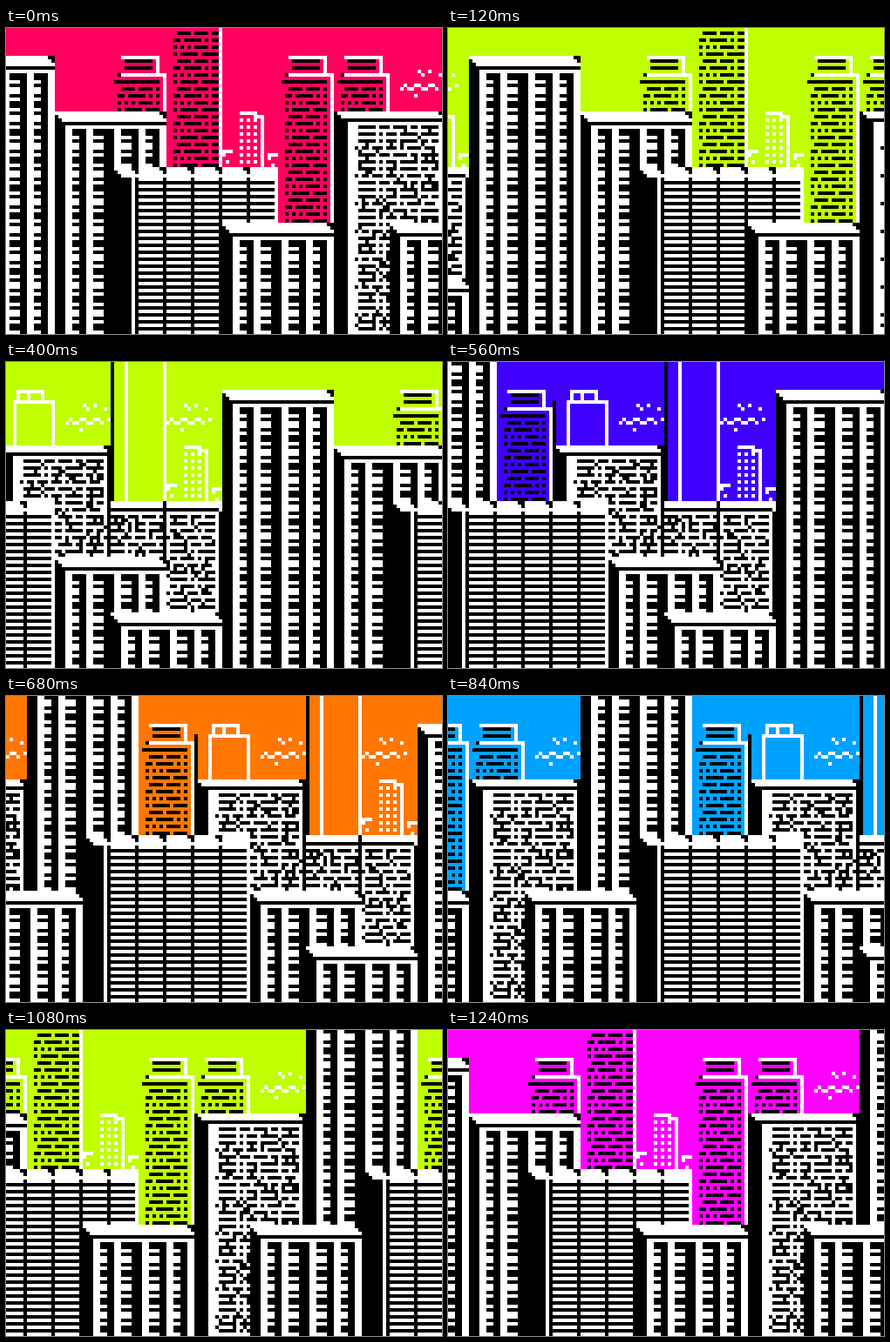
Animation of 500x352 px, one loop 1280 ms. Source, as an HTML page with a canvas:

```html
<!DOCTYPE html>
<html lang="en">
<head>
<meta charset="utf-8">
<title>Pixel city</title>
<style>
  html, body { margin: 0; width: 100%; height: 100%; overflow: hidden; background: #000; }
  canvas { display: block; width: 500px; height: 352px; image-rendering: pixelated; }
</style>
</head>
<body>
<canvas id="view" width="125" height="88"></canvas>
<script>
const WORLD = 256, HEIGHT = 88, STEP_MS = 40, STEPS = 32, STEP_CELLS = 8;
const BLACK = '#000', WHITE = '#fff';
const SKIES = ['#ff005f', '#ff7700', '#bfff00', '#bfff00', '#00ff7f', '#00a2ff', '#3f00ff', '#ff00ff'];

// The skyline is drawn once, one canvas pixel per cell, with a transparent sky.
const city = document.createElement('canvas');
city.width = WORLD;
city.height = HEIGHT;
const pen = city.getContext('2d');

function rect(x, y, w, h, color) {
  pen.fillStyle = color || BLACK;
  for (const wrap of [0, -WORLD]) {
    if (color) pen.fillRect(x + wrap, y, w, h);
    else pen.clearRect(x + wrap, y, w, h);
  }
}

function noise(x, y) {
  const n = Math.sin(x * 12.9898 + y * 78.233) * 43758.5453;
  return n - Math.floor(n);
}

// Two broken, scalloped outlines, the upper one shorter.
function cloud(x) {
  for (const [y, start, end] of [[12, 5, 13], [16, 0, 13]]) {
    for (let dx = start; dx < end; dx++) {
      const dip = Math.sin(dx * 1.6) > 0 ? 0 : 1;
      if (noise(dx, y) > 0.25) rect(x + dx, y + dip, 1, 1, WHITE);
    }
  }
  rect(x + 4, 19, 1, 1, WHITE);
}

// Rows of black dashes; the pattern repeats with the 8-cell tile.
function bricks(x, top, width, bottom) {
  for (let y = top; y < bottom; y += 2) {
    let dx = Math.floor(noise(1, y % 8) * 2);
    while (dx < width) {
      const len = 1 + Math.floor(noise(dx, y % 8) * 5);
      rect(x + dx, y, Math.min(len, width - dx), 1, BLACK);
      dx += len + 1;
    }
  }
}

function steppedTower(x, bottom) {
  rect(x, 8, 16, bottom - 8, null);
  rect(x + 3, 8, 11, 1, WHITE);
  rect(x + 13, 8, 1, 5, WHITE);
  rect(x + 4, 9, 8, 1, BLACK);
  rect(x + 4, 11, 8, 1, BLACK);
  rect(x + 2, 13, 1, 1, BLACK);
  rect(x + 3, 13, 13, 1, WHITE);
  rect(x + 15, 13, 1, bottom - 13, WHITE);
  rect(x + 1, 15, 13, 1, BLACK);
  bricks(x + 2, 17, 12, bottom);
}

function farBlock(x) {
  rect(x + 5, 24, 5, 1, WHITE);
  rect(x + 9, 25, 3, 1, WHITE);
  rect(x + 11, 25, 1, 15, WHITE);
  for (let y = 26; y < 40; y += 2) {
    for (let dx = 5; dx < 11; dx += 2) rect(x + dx, y, 1, 1, WHITE);
  }
  for (const [dx, y] of [[0, 35], [13, 36]]) {
    rect(x + dx, y, 3, 1, WHITE);
    rect(x + dx, y + 1, 1, 1, WHITE);
    rect(x + dx + 1, y + 3, 1, 1, WHITE);
  }
}

// White slab with a stepped left corner and a black line under it.
function roof(x, y, line) {
  rect(x, y, 32, HEIGHT - y, WHITE);
  for (let row = 0; row < line; row++) rect(x, y + row, Math.max(0, 3 - line + row), 1, BLACK);
  rect(x, y + line, 32, 1, BLACK);
  rect(x + 30, y, 2, 1, BLACK);
  rect(x + 31, y + 1, 1, 1, BLACK);
}

function office(x, y) {
  roof(x, y, 3);
  rect(x, y + 3, 3, HEIGHT, BLACK);
  for (const [dx, width] of [[5, 4], [11, 6], [19, 5], [26, 4]]) {
    const sill = Math.ceil(width / 2);
    rect(x + dx + sill, y + 5, width - sill, HEIGHT, BLACK);
    // Three sills per tile, the first one two cells thick
    for (let row = y + 5; row < HEIGHT; row += 8) {
      rect(x + dx, row, sill, 2, BLACK);
      rect(x + dx, row + 3, sill, 1, BLACK);
      rect(x + dx, row + 6, sill, 1, BLACK);
    }
  }
}

function masonry(x, y, width) {
  bricks(x, y, width, HEIGHT);
  for (let row = y + 1; row < HEIGHT; row += 2) {
    for (let dx = 0; dx < width; dx++) {
      if (noise(x + dx, row) < 0.15) rect(x + dx, row, 1, 1, BLACK);
    }
  }
}

function stoneBlock(x, y) {
  roof(x, y, 2);
  rect(x, y + 2, 4, HEIGHT, BLACK);
  rect(x + 31, y + 3, 1, HEIGHT, BLACK);
  masonry(x + 6, y + 4, 24);
}

function blindsBlock(x) {
  const y = 40, width = 48;
  rect(x, y, 6, HEIGHT, BLACK);
  rect(x + 6, y, width - 6, HEIGHT, WHITE);
  for (let row = 0; row < 3; row++) rect(x + 1 + row, y + row, 5 - row, 1, WHITE);
  for (let row = y + 4; row < HEIGHT; row += 2) rect(x + 7, row, width - 8, 1, BLACK);
  for (let dx = 7; dx < width - 1; dx += 8) {
    rect(x + dx - 1, y, 2, 1, BLACK);
    rect(x + dx, y + 1, 1, 1, BLACK);
    rect(x + dx, y + 3, 1, HEIGHT, BLACK);
  }
}

function outlinedBox(x) {
  rect(x, 11, 1, 13, BLACK);
  rect(x + 4, 11, 12, 1, WHITE);
  for (const dx of [4, 15]) rect(x + dx, 11, 1, 13, WHITE);
  rect(x + 5, 8, 8, 1, WHITE);
  for (const dx of [5, 8, 12]) rect(x + dx, 8, 1, 3, WHITE);
}

function outlinedTower(x) {
  rect(x, 0, 16, 40, null);
  rect(x, 0, 1, 40, BLACK);
  for (const dx of [4, 15]) rect(x + dx, 0, 1, 40, WHITE);
}

function buildCity() {
  for (const x of [113, 193, 222]) cloud(x);
  for (const x of [62, 222]) farBlock(x);

  steppedTower(30, 24);
  bricks(48, 1, 13, 40);
  rect(61, 0, 1, 40, WHITE);
  steppedTower(78, 56);
  steppedTower(94, 24);
  steppedTower(158, 40);
  outlinedBox(174);
  outlinedTower(206);

  office(14, 24);
  stoneBlock(94, 24);
  stoneBlock(174, 24);
  office(126, -8);

  // Low stone wing joined to the block on its left
  rect(206, 40, 32, 48, WHITE);
  rect(206, 42, 31, 1, BLACK);
  rect(237, 43, 1, 45, BLACK);
  masonry(204, 44, 32);
  rect(221, 40, 1, 16, BLACK);

  office(238, 8);
  for (const x of [30, 142]) blindsBlock(x);
  for (const x of [62, 110, 190]) office(x, 56);
  office(206, 72);
}

const view = document.getElementById('view').getContext('2d');

function draw() {
  const step = Math.floor(performance.now() / STEP_MS) % STEPS;
  const shift = step * STEP_CELLS;
  view.fillStyle = SKIES[step % SKIES.length];
  view.fillRect(0, 0, 125, HEIGHT);
  view.drawImage(city, shift, 0);
  view.drawImage(city, shift - WORLD, 0);
  requestAnimationFrame(draw);
}

buildCity();
draw();
</script>
</body>
</html>
```
